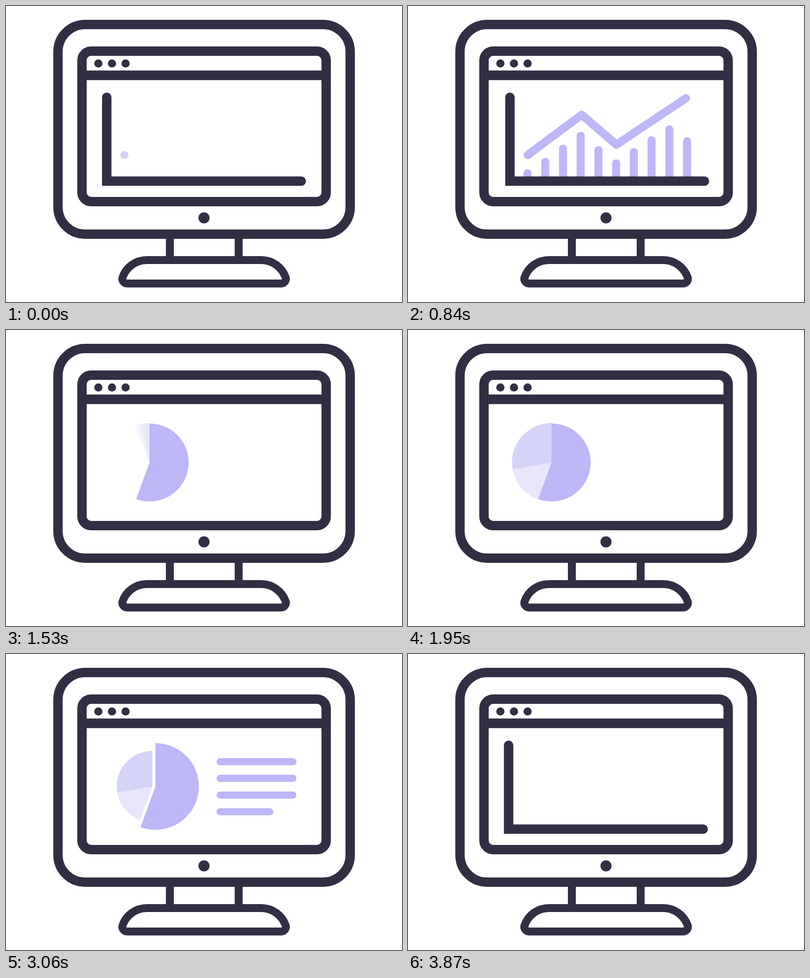
Write an HTML page with a canvas that moves like this. It is 800 by 600 pixels and loops after 3900 ms.

```html
<!DOCTYPE html>
<html lang="en">
<head>
<meta charset="utf-8">
<title>Charts on a monitor</title>
<style>
  html, body { margin: 0; width: 100%; height: 100%; overflow: hidden; background: #fff; }
  canvas { display: block; }
</style>
</head>
<body>
<canvas id="stage" width="800" height="600"></canvas>
<script>
const LOOP = 3900, SHUTTER = 15, SAMPLES = 16;
const DARK = '#322f44', LILAC = '#bdb6f7', SOFT = '#d6d3f9', PALE = '#e8e5fc';

const stage = document.getElementById('stage').getContext('2d');
const layer = document.createElement('canvas');
layer.width = 800;
layer.height = 600;
const g = layer.getContext('2d');

const clamp = v => Math.max(0, Math.min(1, v));
const mix = (a, b, p) => a + (b - a) * p;
const progress = (t, start, length) => clamp((t - start) / length);
const smooth = p => p * p * (3 - 2 * p);
const easeOut = p => 1 - (1 - p) ** 3;

// Symmetric cubic-bezier (0.94, 0, 0.06, 1), solved by bisection.
function sharpEase(x) {
  let low = 0, high = 1;
  for (let i = 0; i < 24; i++) {
    const s = (low + high) / 2, r = 1 - s;
    if (2.82 * s * r * r + 0.18 * s * s * r + s ** 3 < x) low = s; else high = s;
  }
  return smooth(low);
}

// Eased interpolation through [time, value] pairs.
function keyed(t, keys) {
  const i = keys.findIndex(key => key[0] > t);
  if (i === 0) return keys[0][1];
  if (i < 0) return keys[keys.length - 1][1];
  const [t0, v0] = keys[i - 1], [t1, v1] = keys[i];
  return mix(v0, v1, smooth((t - t0) / (t1 - t0)));
}

// Wind up to the right, shoot one stage width left, overshoot and settle.
function slide(t, start) {
  const launch = start + 128, landing = launch + 695;
  if (t < launch) return 10 * smooth(progress(t, start, 128));
  if (t < landing) return mix(10, -810, sharpEase((t - launch) / 695));
  return mix(-810, -800, smooth(progress(t, landing, 157)));
}

function stroke(c, path, width, color, cap = 'butt') {
  c.lineWidth = width;
  c.strokeStyle = color;
  c.lineCap = cap;
  c.stroke(path);
}

function dot(c, x, y, r) {
  c.fillStyle = DARK;
  c.beginPath();
  c.arc(x, y, r, 0, 7);
  c.fill();
}

function roundedRect(x, y, w, h, r) {
  const path = new Path2D();
  path.roundRect(x, y, w, h, r);
  return path;
}

const axes = new Path2D('M203.5 185V355H596.5');
const trend = new Path2D('M239.3 302L348.3 220.5L418.5 281L559 187');
const TREND_LENGTH = 398;
const barTops = [331, 308, 281, 255, 284, 311, 288, 264, 242, 218];

function drawChart(t, offset, withData) {
  g.save();
  g.translate(offset, 0);
  if (withData) {
    barTops.forEach((top, i) => {
      const p = smooth(progress(t, 219 + i * 60, 140));
      if (!p) return;
      const x = 239 + 35.8 * i;
      stroke(g, new Path2D(`M${x} 355V${mix(355, top + 8, p)}`), 16, LILAC, 'round');
    });
    g.globalAlpha = clamp(0.6 + t / 75);
    g.lineJoin = 'round';
    g.setLineDash([Math.max(0.01, TREND_LENGTH * smooth(progress(t, 0, 720))), 999]);
    stroke(g, trend, 16.5, LILAC, 'round');
    g.setLineDash([]);
    g.globalAlpha = 1;
    g.lineJoin = 'miter';
  }
  stroke(g, axes, 19, DARK, 'round');
  g.restore();
}

// Angles in degrees, clockwise from the top.
function wedge(x, r, from, to, color) {
  if (to <= from) return;
  const rad = a => (a - 90) * Math.PI / 180;
  g.fillStyle = color;
  g.beginPath();
  g.moveTo(x, 268.5);
  g.arc(x, 268.5, r, rad(from), rad(to));
  g.fill();
}

function drawPie(t) {
  const big = keyed(t, [[2250, 1], [2340, 0.96], [2550, 1.25], [2790, 1.11]]);
  const small = keyed(t, [[2250, 1], [2340, 1.06], [2550, 0.79], [2760, 0.9]]);
  const nudge = keyed(t, [[1650, 0], [1800, -8], [1950, 0]]);
  const smallX = 252 + 38 * small + nudge, smallR = 79.8 * small;
  wedge(smallX, smallR, -160 * easeOut(progress(t, 1521, 330)), 0, PALE);
  wedge(smallX, smallR, -100 * easeOut(progress(t, 1600, 350)), 0, SOFT);
  wedge(268 + 22 * big, 79 * big, 0, 200 * easeOut(progress(t, 1310, 200)), LILAC);
}

function drawTextLines(t) {
  for (let i = 0; i < 4; i++) {
    const start = 2520 + i * 60, y = 218.3 + 33.8 * i;
    if (t <= start) continue;
    const end = mix(423.3, i < 3 ? 570 : 523, easeOut(progress(t, start, 150)));
    g.globalAlpha = progress(t, start, 90);
    stroke(g, new Path2D(`M423.3 ${y}H${end}`), 14.5, LILAC, 'round');
  }
  g.globalAlpha = 1;
}

// Moving parts follow the shutter time; growing strokes follow the clock.
function drawScreen(t, shutterTime) {
  g.fillStyle = '#fff';
  g.fillRect(0, 0, 800, 600);
  if (t < 1700) drawChart(t, slide(shutterTime, 800), true);
  if (t > 1250) {
    const offset = slide(shutterTime, 2905);
    g.save();
    g.translate(offset, 0);
    drawPie(shutterTime);
    drawTextLines(t);
    g.restore();
    if (t > 3030) drawChart(t, offset + 800, false);
  }
}

const base = new Path2D('M285 515H515.5C538 515 557 529 565 550C567 556 562 562.5 556 562.5' +
  'H245C238 562.5 233.5 556 235.5 550C243 529 262 515 285 515Z');

function drawMonitor() {
  stroke(stage, roundedRect(105, 37.5, 590.3, 425, 55), 19, DARK);
  stroke(stage, roundedRect(153.5, 91.5, 493.3, 305, 18.5), 19, DARK);
  stroke(stage, new Path2D('M155 140.5H645'), 19.5, DARK);
  stroke(stage, new Path2D('M331 465V512M470 465V512'), 16, DARK);
  stroke(stage, base, 16, DARK);
  for (const x of [186.6, 214.1, 241.6]) dot(stage, x, 116.5, 8.3);
  dot(stage, 400, 429.5, 11.2);
}

function render(t) {
  stage.fillStyle = '#fff';
  stage.fillRect(0, 0, 800, 600);
  stage.save();
  stage.beginPath();
  stage.rect(160, 148, 480, 242);
  stage.clip();
  const moving = (t > 800 && t < 1960) || t > 2240;
  const count = moving ? SAMPLES : 1;
  for (let k = 0; k < count; k++) {
    drawScreen(t, t + SHUTTER * ((k + 0.5) / count - 0.5));
    stage.globalAlpha = 1 / (k + 1);
    stage.drawImage(layer, 0, 0);
  }
  stage.restore();
  drawMonitor();
}

const began = performance.now();
function tick() {
  render((performance.now() - began) % LOOP);
  requestAnimationFrame(tick);
}
tick();
</script>
</body>
</html>
```
